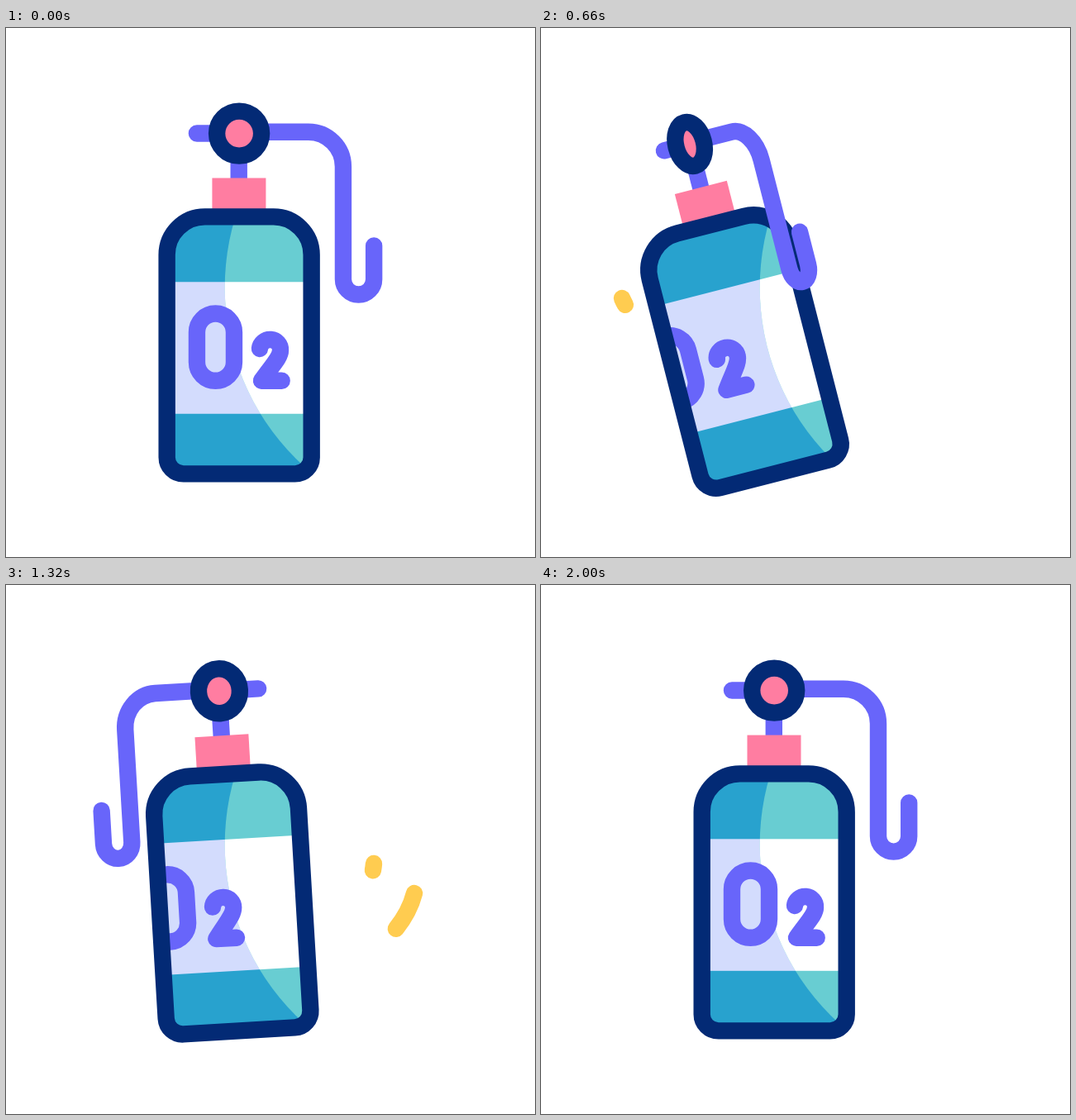
These frames come from a looping animation (640 px wide and 640 px high, 2.4 s). An HTML page with a canvas:

```html
<!DOCTYPE html>
<html lang="en">
<head>
<meta charset="utf-8">
<title>Oxygen tank</title>
<style>
  html, body { margin: 0; height: 100%; overflow: hidden; background: #fff; }
  canvas { display: block; width: 100vw; height: 100vh; }
</style>
</head>
<body>
<canvas width="640" height="640"></canvas>
<script>
const ctx = document.querySelector('canvas').getContext('2d');
const LOOP = 2400;
const NAVY = '#032a75', PURPLE = '#6865fa', PINK = '#ff7da1', YELLOW = '#ffcc50';
const AXIS = 282.2, FLOOR = 539;

// Keys are [time, value]
const TILT = [[0, 0], [560, -18], [1040, 5.8], [1300, -3.5], [1780, 2.1], [2000, 0]];
const TURN = [[0, 1], [560, 0.495], [860, 1], [1260, -1], [1780, 1]];
const LABEL_OUT = [[0, 0], [560, -73.5], [1360, 288]];

const clamp = u => Math.min(1, Math.max(0, u));
const smooth = u => u * u * (3 - 2 * u);

// softness 1 is a full ease in and out, 0 is linear
function track(keys, t, softness = 1) {
  const i = keys.findIndex(k => k[0] > t);
  if (i < 0) return keys[keys.length - 1][1];
  const [t0, v0] = keys[i - 1], [t1, v1] = keys[i];
  const u = (t - t0) / (t1 - t0);
  return v0 + (v1 - v0) * (u + softness * (smooth(u) - u));
}

// The label leaves on the right and comes back in from the left
function labelShift(t) {
  if (t < 1050) return track(LABEL_OUT, t);
  return t < 2000 ? 1.67 - 50 * Math.exp((1320 - t) / 200) : 0;
}

function makeStreak(d, grow, shrink) {
  const el = document.createElementNS('http://www.w3.org/2000/svg', 'path');
  el.setAttribute('d', d);
  return { path: new Path2D(d), length: el.getTotalLength(), grow, shrink };
}

const streaks = [
  makeStreak('M98 327C120 376 185 423 280 423C365 423 440 400 445 337', [610, 1204], [841, 1365]),
  makeStreak('M394 470C445 450 483 415 494 373', [968, 1135], [1150, 1430])
];

const tank = new Path2D();
tank.roundRect(194.7, 228.4, 175, 311, [46, 46, 20, 20]);

const letters = new Path2D('M307 388A12.5 12 0 0 1 332 390C332 399 322 408 309 426.7H333.7');
letters.roundRect(231, 345.5, 45, 81.3, 22.5);

function stroke(color, path) {
  ctx.strokeStyle = color;
  ctx.stroke(path);
}

function rect(color, x, y, w, h) {
  ctx.fillStyle = color;
  ctx.fillRect(x, y, w, h);
}

function tilt(degrees) {
  ctx.translate(AXIS, FLOOR);
  ctx.rotate(degrees * Math.PI / 180);
  ctx.translate(-AXIS, -FLOOR);
}

function bands(liquid, paper) {
  rect(liquid, 190, 220, 185, 325);
  rect(paper, 190, 307.3, 185, 159.5);
}

function hose(turn) {
  const pipe = new Path2D('M231 127.5H282V125.7H366A42 42 0 0 1 408 167.7V304A18.6 18.6 0 0 0 445.2 304V263.5');
  const turned = new Path2D();
  turned.addPath(pipe, new DOMMatrix([turn, 0, 0, 1, AXIS * (1 - turn), 0]));
  stroke(PURPLE, turned);
}

function body(angle, shift) {
  ctx.save();
  ctx.clip(tank);
  bands('#28a2ce', '#d3dcfd');

  // The lit side stays still while the tank tilts
  ctx.save();
  ctx.resetTransform();
  ctx.beginPath();
  ctx.arc(556.7, 314, 292, 0, 7);
  ctx.clip();
  tilt(angle);
  bands('#68cdd2', '#fff');
  ctx.restore();

  ctx.translate(shift, 0);
  stroke(PURPLE, letters);
  ctx.restore();
  stroke(NAVY, tank);
}

function valve(turn) {
  ctx.beginPath();
  ctx.ellipse(AXIS, 127.6, 27 * Math.abs(turn), 27, 0, 0, 2 * Math.PI);
  ctx.fillStyle = PINK;
  ctx.fill();
  ctx.strokeStyle = NAVY;
  ctx.stroke();
}

function drawStreak({ path, length, grow, shrink }, t) {
  const along = ([a, b]) => length * smooth(clamp((t - a) / (b - a)));
  const head = along(grow), tail = along(shrink);
  if (head - tail < 0.1) return;
  ctx.setLineDash([head - tail, 2 * length]);
  ctx.lineDashOffset = -tail;
  stroke(YELLOW, path);
  ctx.setLineDash([]);
}

function draw(t) {
  const angle = track(TILT, t, 0.6), turn = track(TURN, t);
  const behind = t > 860 && t < 1260;

  ctx.resetTransform();
  rect('#fff', 0, 0, 640, 640);
  ctx.lineWidth = 20.4;
  ctx.lineCap = ctx.lineJoin = 'round';

  ctx.save();
  tilt(angle);
  if (behind) hose(turn);
  rect(PURPLE, 271.6, 145, 20.4, 40);
  rect(PINK, 249.5, 181.6, 65, 42);
  body(angle, labelShift(t));
  if (!behind) hose(turn);
  valve(turn);
  ctx.restore();

  for (const streak of streaks) drawStreak(streak, t);
}

const start = performance.now();
function frame() {
  draw((performance.now() - start) % LOOP);
  requestAnimationFrame(frame);
}
frame();
</script>
</body>
</html>
```
